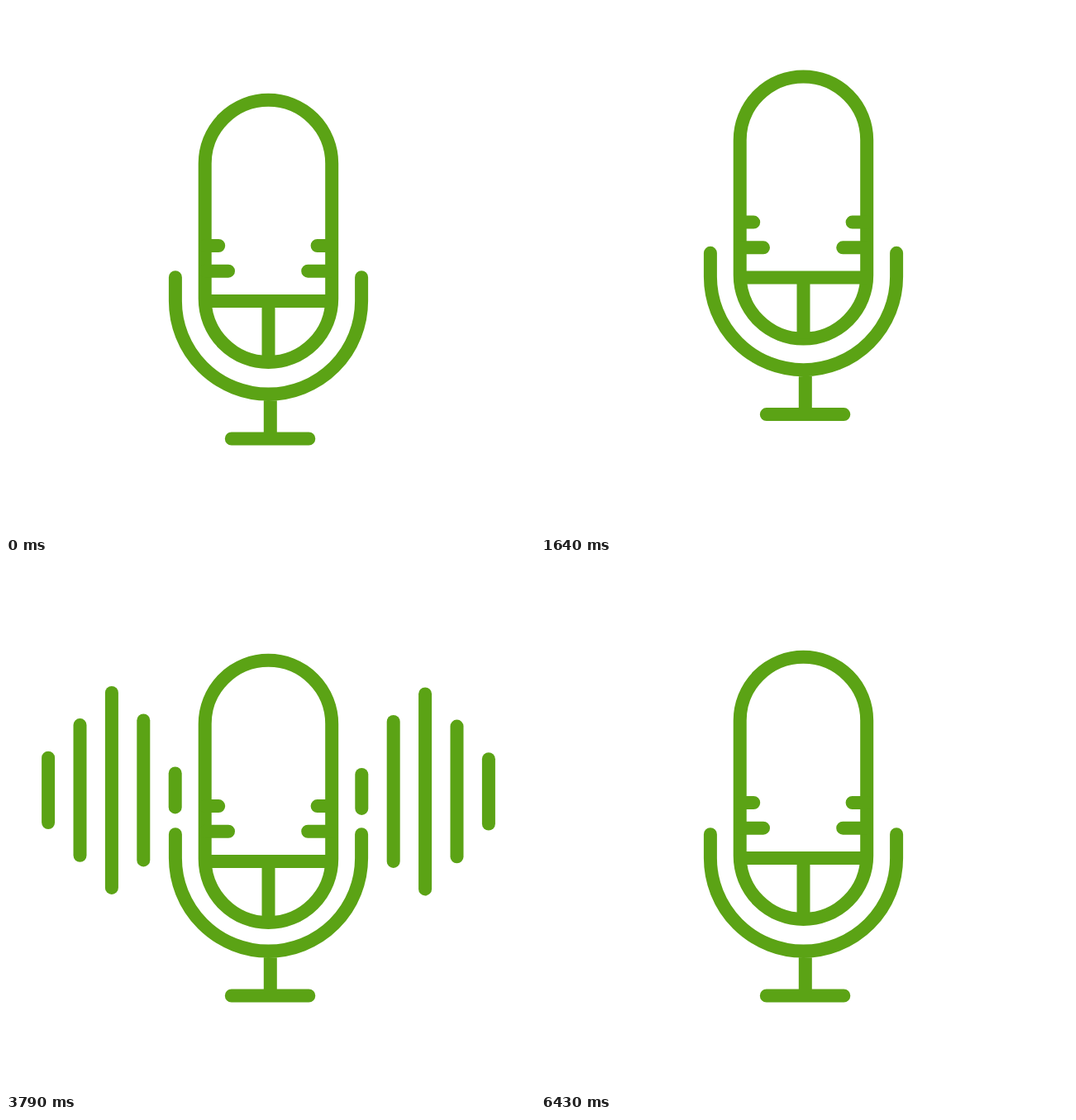
These frames come from a looping animation (640 by 640 pixels, 6.5 s). An HTML page:

```html
<!DOCTYPE html>
<html lang="en">
<head>
<meta charset="utf-8">
<title>Microphone</title>
<style>
  html, body { margin: 0; width: 100%; height: 100%; overflow: hidden; background: #fff; }
  svg { display: block; width: 100%; height: 100%; }
</style>
</head>
<body>
<svg viewBox="0 0 640 640" fill="none" stroke="#5ba315" stroke-width="16" stroke-linecap="round">
  <g id="waves"></g>
  <g id="mic">
    <path d="M204.9 328.2V357A112.6 112.6 0 0 0 430.1 357V328.2M319.8 470V523M272.8 523.5H366.3"/>
    <g id="head">
      <rect x="240.7" y="113.8" width="153.5" height="317.2" rx="76.75"/>
      <path d="M241 290H257.2M241 320.7H269M394 290H376.6M394 320.7H365.2"/>
      <path d="M241 356.9H394M317.5 357V431" stroke-linecap="butt"/>
    </g>
  </g>
</svg>
<script>
  const LOOP = 6500, STEPS = 91, STEP = LOOP / STEPS;
  const FLOOR = 531.5, CENTER = 317.5;
  const $ = id => document.getElementById(id);

  // each bar swings around its middle reach, outermost bar first
  const swings = [
    { mid: 32.6, amp: 18.5, peak: 4286, period: 2600 },
    { mid: 53.2, amp: 36.3, peak: 3460, period: 2600 },
    { mid: 85.4, amp: 32.6, peak: 3786, period: 1950 },
    { mid: 59.1, amp: 28.1, peak: 3940, period: 2200 },
    { mid: 15, amp: 5.5, peak: 3786, period: 1950 }
  ];

  const bars = swings.flatMap((swing, i) => [-1, 1].map(side => {
    const el = document.createElementNS("http://www.w3.org/2000/svg", "path");
    $("waves").append(el);
    return { el, swing, x: CENTER + side * (266.4 - 38.4 * i), y: side < 0 ? 274.9 : 276.4 };
  }));

  function ease(t, from, to) {
    const p = Math.min(1, Math.max(0, (t - from) / (to - from)));
    return (1 - Math.cos(Math.PI * p)) / 2;
  }

  // rises from 0 to 1 at the peak, then falls back
  const pulse = (t, from, peak, to) => ease(t, from, peak) - ease(t, peak, to);

  const jump = t => -54 * pulse(t, 297, 1190, 2150);

  const stretch = t => 1 - 0.035 * pulse(t, 0, 330, 714) + 0.012 * pulse(t, 330, 714, 1190);

  // the head lags behind in the jump, then rocks to rest after landing
  const sway = t => 6 * pulse(t, 300, 714, 1190) + pulse(t, 1190, 1643, 2000)
    + 12 * pulse(t, 2000, 2290, 2600)
    - 6 * pulse(t, 2290, 2600, 3560)
    + 5.6 * pulse(t, 2600, 3560, 4200);

  function draw(time) {
    const step = Math.min(STEPS - 1, Math.floor((time % LOOP + 5) / STEP));
    const t = step * STEP;
    const s = stretch(t);
    $("mic").setAttribute("transform",
      `translate(0 ${jump(t) + FLOOR * (1 - s)}) scale(1 ${s})`);
    $("head").setAttribute("transform", `translate(0 ${sway(t)})`);

    const grown = ease(t, 2190, 2857) - ease(t, 5800, 6400);
    for (const { el, swing, x, y } of bars) {
      const { mid, amp, peak, period } = swing;
      const reach = grown * (mid + amp * Math.cos(2 * Math.PI * (t - peak) / period));
      el.setAttribute("d", grown > 0.001 ? `M${x} ${y - reach}V${y + reach}` : "");
    }
  }

  let start;
  function tick(now) {
    start ??= now;
    draw(now - start);
    requestAnimationFrame(tick);
  }
  draw(0);
  requestAnimationFrame(tick);
</script>
</body>
</html>
```
